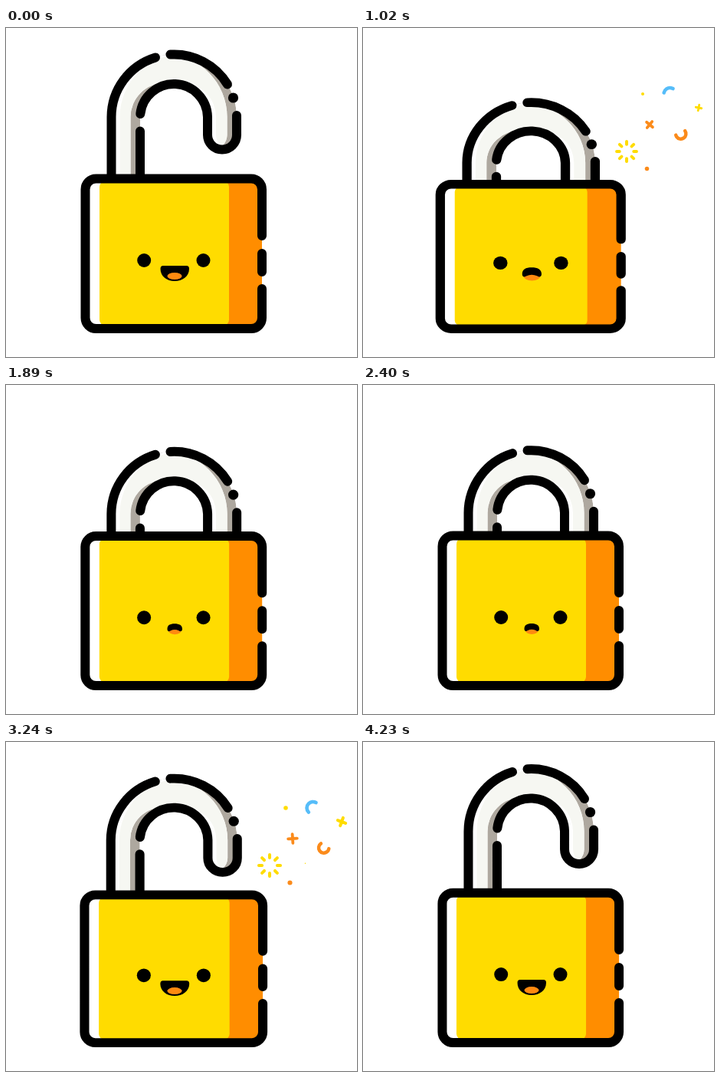
Write an HTML page with a canvas that moves like this. It is 458x429 px and loops after 4260 ms.

```html
<!DOCTYPE html>
<html>
<head>
<meta charset="utf-8">
<style>
html, body { margin: 0; width: 100%; height: 100%; overflow: hidden; background: #fff; }
canvas { display: block; }
</style>
</head>
<body>
<canvas id="stage" width="458" height="429"></canvas>
<script>
const ctx = document.getElementById('stage').getContext('2d');
const LOOP = 4260, HALF = LOOP / 2, IMPACT = 870, TRAVEL = 51.5;
const YELLOW = '#ffdc00', ORANGE = '#ff8d00', BLUE = '#56bdf9', BURST_ORANGE = '#fb8b1b';

const progress = (t, from, to) => Math.min(1, Math.max(0, (t - from) / (to - from)));
const mix = (a, b, p) => a + (b - a) * p;
const smooth = p => (1 - Math.cos(Math.PI * p)) / 2;
const easeOut = p => Math.sin(Math.PI * p / 2);
// Grows from nothing and shrinks back between two times.
const pulse = (t, from, to) => Math.sin(Math.PI * progress(t, from, to));
// Damped swing that crosses zero every half period.
const spring = (t, amp, half) =>
  t < 0 ? 0 : amp * Math.exp(-.0033 * t) * Math.sin(Math.PI * t / half);

const shackleBand = new Path2D(
  'M137.5 330V116A81.5 81.5 0 0 1 301 116V139.5A19 19 0 0 1 263 139.5V116A44 44 0 0 0 175 116V330Z');
const shackleLines = new Path2D(
  'M137.5 330V116A81.5 81.5 0 0 1 195 38.4M214.5 34.6A81.5 81.5 0 0 1 289 73.5' +
  'M301 114V139.5A19 19 0 0 1 263 139.5V116A44 44 0 0 0 175.3 112M175 134.5V330');
const bodyLines = new Path2D(
  'M334 271V210.5A14 14 0 0 0 320 196.5H117.5A14 14 0 0 0 103.5 210.5V378' +
  'A14 14 0 0 0 117.5 392H320A14 14 0 0 0 334 378V340M334 294V318');
const smile = new Path2D(
  'M205 310H235.5Q239 310 239 314C239 324 230 330 220 330S201.5 324 201.5 314Q201.5 310 205 310Z');
const frown = new Path2D(
  'M210.5 318C210.5 313 214 311 220 311S230 313 230 318C230 321.5 227 321.5 225.5 320' +
  'Q220 317.5 215 320C213 321.5 210.5 321.5 210.5 318Z');

function shifted(path, dx) {
  const moved = new Path2D();
  moved.addPath(path, { e: dx });
  return moved;
}
const litBand = shifted(shackleBand, -12.5), innerBand = shifted(shackleBand, 11);

function fill(color, path) {
  ctx.fillStyle = color;
  ctx.fill(path);
}

function box(color, x, y, w, h, r) {
  const path = new Path2D();
  path.roundRect(x, y, w, h, r);
  fill(color, path);
}

function oval(color, x, y, rx, ry = rx) {
  const path = new Path2D();
  path.ellipse(x, y, Math.max(0, rx), Math.max(0, ry), 0, 0, 7);
  fill(color, path);
}

function stroke(color, width, path) {
  if (width <= 0) return;
  ctx.strokeStyle = color;
  ctx.lineWidth = width;
  ctx.lineCap = ctx.lineJoin = 'round';
  ctx.stroke(path);
}

function drawShackle(y) {
  ctx.save();
  ctx.translate(0, y);
  ctx.save();
  ctx.clip(shackleBand);
  fill('#aea89f', shackleBand);
  ctx.clip(litBand);
  fill('#fff', shackleBand);
  fill('#f6f7f2', innerBand);
  ctx.restore();
  stroke('#000', 12, shackleLines);
  oval('#000', 296.5, 91, 6.6);
  ctx.restore();
}

function drawMouth(sad) {
  const scale = sad < .5 ? 1 - .6 * sad : 2 - sad;
  ctx.save();
  ctx.translate(220, 318);
  ctx.scale(scale, scale);
  ctx.translate(-220, -318);
  if (sad < .5) {
    fill('#000', smile);
    oval('#ff8a10', 220, 323.5, 9.5, 4.5);
  } else {
    oval('#ff8a10', 220.3, 320.3, 8.3, 4.7);
    fill('#000', frown);
  }
  ctx.restore();
}

function drawBody(sad) {
  box('#fff', 103.5, 196.5, 230.5, 195.5, 14);
  box(ORANGE, 280, 198, 54, 192, [0, 14, 14, 0]);
  box('#fff', 110, 202, 20, 184, 0);
  box(YELLOW, 122, 200, 169, 187.5, 7);
  stroke('#000', 12, bodyLines);
  oval('#000', 180.2, 303, 9);
  oval('#000', 257.5, 303, 9);
  drawMouth(sad);
}

// Evenly spaced rays between radii a and b.
function rays(x, y, count, turn, a, b, width, color) {
  const path = new Path2D();
  for (let i = 0; i < count; i++) {
    const angle = (turn / 180 + 2 * i / count) * Math.PI;
    const c = Math.cos(angle), s = Math.sin(angle);
    path.moveTo(x + a * c, y + a * s);
    path.lineTo(x + (b + .01) * c, y + (b + .01) * s);
  }
  stroke(color, width, path);
}

function star(x, y, turn, arm, width, color) {
  rays(x, y, 4, turn, 0, arm, Math.min(width, arm * .75), color);
}

function arc(x, y, r, from, to, width, color) {
  const path = new Path2D(), rad = Math.PI / 180;
  path.arc(x, y, r, from * rad, to * rad + .001);
  stroke(color, width, path);
}

function drawBurst(t) {
  const sun = progress(t, 620, 1680), outer = 8 + 13 * sun;
  rays(344, 161, 8, 0, Math.min(outer, 8.5 + 14 * sun ** 3), outer,
    Math.min(4, 18 * pulse(t, 620, 1680)), YELLOW);

  oval(YELLOW, 365, 86, 3.4 * pulse(t, 850, 1700));
  oval(BURST_ORANGE, 370.5, 183.5, 3.1 * pulse(t, 700, 1620));
  oval(YELLOW, 390.5, 158.3, 2.2 * pulse(t, 1030, 1800));

  star(438, 104, 20 * progress(t, 900, 1110), 7.4 * pulse(t, 850, 1850), 4.8, YELLOW);
  star(374, 126, 90 * smooth(progress(t, 920, 1140)), 6 * pulse(t, 750, 1600), 3.8, BURST_ORANGE);

  // Each arc's head runs ahead round the circle and its tail catches up.
  arc(400.5, 86, 8,
    mix(300, 40, easeOut(progress(t, 870, 1420))), mix(300, 40, progress(t, 1120, 1520)),
    Math.min(4.6, 30 * pulse(t, 870, 1540)), BLUE);
  ctx.globalAlpha = 1 - progress(t, 1350, 1600);
  arc(414.7, 138, 6.7,
    mix(-90, 390, progress(t, 690, 1480) ** 2.5), mix(-90, 390, progress(t, 690, 1310)),
    Math.min(4.5, 30 * pulse(t, 640, 1560)), BURST_ORANGE);
  ctx.globalAlpha = 1;
}

function draw(time) {
  const t = time % HALF, opening = time >= HALF;
  const slide = progress(t, 0, IMPACT) ** 3.6;
  const shackleY = opening
    ? TRAVEL * (1 - slide) - spring(t - IMPACT, 18, 160)
    : TRAVEL * slide;
  const squash = spring(t - 845, opening ? -.058 : .106, 222);
  const sad = opening
    ? 1 - smooth(progress(t, 850, 1000))
    : smooth(progress(t, 890, 1090));

  ctx.fillStyle = '#fff';
  ctx.fillRect(0, 0, 458, 429);
  ctx.save();
  ctx.translate(219, 398);
  ctx.scale(1 + .65 * squash, 1 - squash);
  ctx.translate(-219, -398);
  drawShackle(shackleY);
  drawBody(sad);
  ctx.restore();
  drawBurst(t);
}

const start = performance.now();
function tick() {
  draw((performance.now() - start) % LOOP);
  requestAnimationFrame(tick);
}
tick();
</script>
</body>
</html>
```
